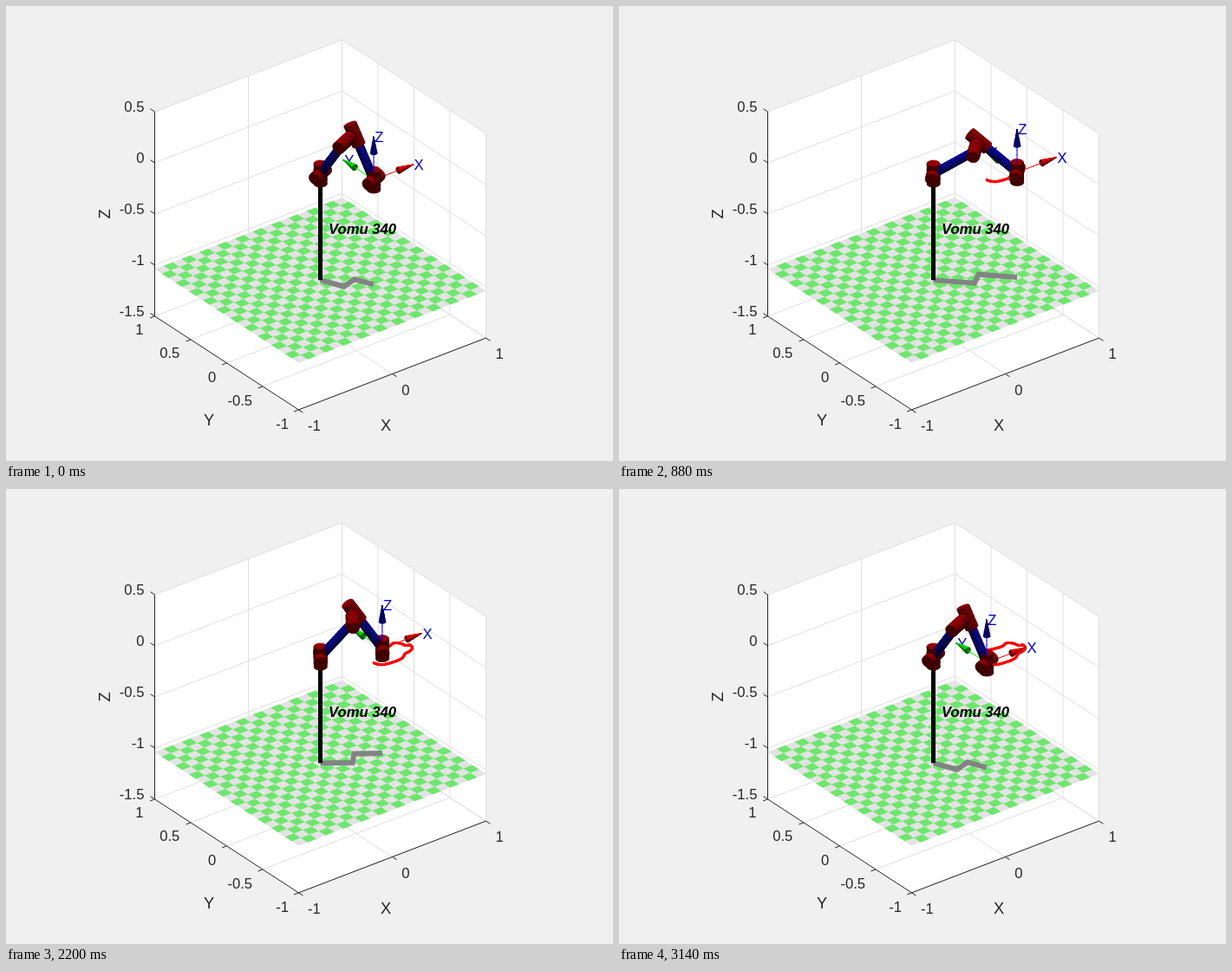
An HTML page with a canvas that plays this animation: 700x525 px, repeating every 3240 ms.

```html
<!DOCTYPE html>
<html>
<head>
<meta charset="utf-8">
<style>
html, body { margin: 0; width: 100%; height: 100%; overflow: hidden; background: #f0f0f0; }
canvas { display: block; }
</style>
</head>
<body>
<canvas id="stage" width="700" height="525"></canvas>
<script>
const ctx = document.getElementById('stage').getContext('2d');
const LOOP = 3240, LAST = 3140, STEP = 20;
const FLOOR = -1.04, TOOL_Z = -0.015, TILES = 21;
const FONT = '"Liberation Sans", Arial, sans-serif';

// Vectors and the orthographic view (azimuth -37.5, elevation 30)
const add = (a, b, s = 1) => a.map((c, i) => c + b[i] * s);
const dot = (a, b) => a[0] * b[0] + a[1] * b[1] + a[2] * b[2];
const unit = a => a.map(c => c / Math.hypot(...a));
const cross = (a, b) => [a[1] * b[2] - a[2] * b[1], a[2] * b[0] - a[0] * b[2], a[0] * b[1] - a[1] * b[0]];
const mix = (a, b, s) => a.map((c, i) => c + (b[i] - c) * s);
const VIEW = [-0.527, -0.687, 0.5];
const LIGHT = unit([-0.08, -0.12, 1]);
const CX = 362.5, CY = 193.5, EX = [108, -41.4], EY = [-83, -54], EZ = -118;
const project = ([x, y, z]) => [CX + x * EX[0] + y * EY[0], CY + x * EX[1] + y * EY[1] + z * EZ];

// Screen position on the tool plane -> world point
function unproject(sx, sy) {
  const u = sx - CX, v = sy - CY - TOOL_Z * EZ;
  const det = EX[0] * EY[1] - EY[0] * EX[1];
  return [(u * EY[1] - v * EY[0]) / det, (v * EX[0] - u * EX[1]) / det, TOOL_Z];
}

function trace(points, close) {
  ctx.beginPath();
  points.forEach(p => ctx.lineTo(...project(p)));
  if (close) ctx.closePath();
}
function stroke(points, color, width = 1) {
  trace(points);
  ctx.strokeStyle = color;
  ctx.lineWidth = width;
  ctx.stroke();
}
function fill(points, color) {
  trace(points, true);
  ctx.fillStyle = color;
  ctx.fill();
}
function text(str, x, y, align = 'left', size = 16.67, color = '#262626', style = '') {
  ctx.font = `${style} ${size}px ${FONT}`;
  ctx.textAlign = align;
  ctx.fillStyle = color;
  ctx.fillText(str, x, y);
}

// Tool path: time, screen x, screen y
const path = [
  [0, 424, 200.5], [170, 431, 202.5], [300, 437, 202.3], [600, 450, 198.5], [790, 457, 195],
  [880, 459, 192], [940, 460.3, 190], [1080, 465, 187.5], [1240, 468.5, 183.5], [1380, 466, 180],
  [1500, 461, 180.5], [1650, 455, 178.2], [1820, 447, 177.8], [1990, 442, 181.5],
  [2250, 432, 184.5], [2580, 420.5, 187.5], [2850, 418.5, 193.5], [LAST, 424, 200.5]
];
function toolAt(t) {
  const n = path.length - 1;
  const key = i => {
    const k = path[(i + n) % n], turn = Math.floor(i / n);
    return [k[0] + turn * LAST, k[1], k[2]];
  };
  let i = 0;
  while (i < n - 1 && path[i + 1][0] <= t) i++;
  const [a, b, c, d] = [key(i - 1), key(i), key(i + 1), key(i + 2)];
  const h = c[0] - b[0], s = (t - b[0]) / h;
  const ease = j => {
    const m0 = (c[j] - a[j]) / (c[0] - a[0]) * h, m1 = (d[j] - b[j]) / (d[0] - b[0]) * h;
    return b[j] + s * m0 + s * s * (3 * (c[j] - b[j]) - 2 * m0 - m1)
      + s * s * s * (2 * (b[j] - c[j]) + m0 + m1);
  };
  return unproject(ease(1), ease(2));
}

// Joint positions by inverse kinematics
function pose(tool) {
  const upper = 0.4318, fore = 0.4323, shift = 0.15;
  const reach = Math.sqrt(tool[0] ** 2 + tool[1] ** 2 - shift ** 2);
  const yaw = Math.atan2(tool[1], tool[0]) - Math.atan2(shift, reach);
  const ahead = [Math.cos(yaw), Math.sin(yaw), 0];
  const side = [-ahead[1], ahead[0], 0];
  const dist = Math.hypot(reach, tool[2]);
  const lift = Math.atan2(tool[2], reach)
    + Math.acos((upper ** 2 + dist ** 2 - fore ** 2) / (2 * upper * dist));
  const elbow = add(ahead.map(c => c * upper * Math.cos(lift)), [0, 0, upper * Math.sin(lift)]);
  const corner = add(elbow, side, shift);
  const normal = cross(side, unit(add(tool, corner, -1)));
  const bend = add(corner, normal, normal[2] < 0 ? -0.0203 : 0.0203);
  return { side, elbow, bend };
}

// Depth-sorted scene parts
let parts = [];
const put = (at, draw) => parts.push([dot(at, VIEW), draw]);

function face(points, normal, rgb) {
  if (dot(normal, VIEW) <= 0) return;
  const k = 0.3 + 0.6 * Math.max(0, dot(normal, LIGHT));
  const color = `rgb(${rgb.map(c => Math.round(c * k)).join()})`;
  const mid = points.reduce((s, p) => add(s, p, 1 / points.length), [0, 0, 0]);
  put(mid, () => {
    fill(points, color);
    ctx.strokeStyle = color;
    ctx.lineWidth = 0.6;
    ctx.stroke();
  });
}
function tube(p, q, r0, r1, rgb, slices) {
  const sides = 24, d = unit(add(q, p, -1));
  const u = unit(cross(d, Math.abs(d[2]) > 0.9 ? [1, 0, 0] : [0, 0, 1])), v = cross(d, u);
  const out = k => {
    const a = k / sides * 2 * Math.PI;
    return add(u.map(c => c * Math.cos(a)), v, Math.sin(a));
  };
  const rim = (s, k) => add(mix(p, q, s), out(k), r0 + (r1 - r0) * s);
  for (let i = 0; i < slices; i++) {
    const s = i / slices, e = (i + 1) / slices;
    for (let k = 0; k < sides; k++)
      face([rim(s, k), rim(s, k + 1), rim(e, k + 1), rim(e, k)], out(k + 0.5), rgb);
  }
  const cap = s => Array.from({ length: sides }, (_, k) => rim(s, k));
  face(cap(0), d.map(c => -c), rgb);
  if (r1) face(cap(1), d, rgb);
}
const joint = (at, dir) => tube(add(at, dir, -0.1), add(at, dir, 0.1), 0.055, 0.055, [165, 0, 0], 4);
const link = (p, q) => tube(p, q, 0.036, 0.036, [0, 0, 190], 12);

function axis(at, dir, name, rgb) {
  const neck = add(at, dir, 0.26), tip = add(at, dir, 0.42);
  for (let i = 0; i < 6; i++) {
    const a = mix(at, neck, i / 6), b = mix(at, neck, (i + 1) / 6);
    put(mix(a, b, 0.5), () => stroke([a, b], `rgb(${rgb})`));
  }
  tube(neck, tip, 0.028, 0, rgb, 3);
  put(tip, () => {
    const [x, y] = project(tip);
    text(name, x + 1.2, y + 6, 'left', 16.67, '#0000c8');
  });
}

function drawBox() {
  ctx.fillStyle = '#f0f0f0';
  ctx.fillRect(0, 0, 700, 525);
  const lo = -1.5, hi = 0.5, grid = '#dfdfdf', ink = '#262626';
  fill([[-1, 1, lo], [-1, 1, hi], [1, 1, hi], [1, -1, hi], [1, -1, lo], [-1, -1, lo]], '#fff');
  for (const z of [-1.5, -1, -0.5, 0, 0.5]) stroke([[-1, 1, z], [1, 1, z], [1, -1, z]], grid);
  for (const x of [0, 1]) stroke([[x, -1, lo], [x, 1, lo], [x, 1, hi]], grid);
  for (const y of [-1, -0.5, 0, 0.5]) stroke([[-1, y, lo], [1, y, lo], [1, y, hi]], grid);
  stroke([[-1, 1, hi], [-1, 1, lo], [-1, -1, lo], [1, -1, lo]], ink);

  ['-1.5', '-1', '-0.5', '0', '0.5'].forEach((s, i) => {
    const z = -1.5 + i / 2, y = -1 + i / 2;
    stroke([[-1, 1, z], [-1, 1.06, z]], ink);
    text(s, 159.5, 357.5 - i * 59, 'right');
    stroke([[-1, y, lo], [-1.05, y, lo]], ink);
    text(['-1', '-0.5', '0', '0.5', '1'][i], 326 - i * 41.9, 488 - i * 27.2, 'right');
  });
  ['-1', '0', '1'].forEach((s, i) => {
    stroke([[i - 1, -1, lo], [i - 1, -1.06, lo]], ink);
    text(s, 348 + i * 108.3, 490 - i * 41.5);
  });
  text('X', 438, 490, 'center', 18.3);
  text('Y', 234, 484, 'center', 18.3);
  ctx.save();
  ctx.translate(120, 240);
  ctx.rotate(-Math.PI / 2);
  text('Z', 0, 0, 'center', 18.3);
  ctx.restore();
}

function drawFloor() {
  const quad = (x, y, s) => [[x, y, FLOOR], [x + s, y, FLOOR], [x + s, y + s, FLOOR], [x, y + s, FLOOR]];
  const size = 2 / TILES;
  fill(quad(-1, -1, 2), '#e3e3e3');
  for (let i = 0; i < TILES; i++)
    for (let j = (i + 1) % 2; j < TILES; j += 2) fill(quad(-1 + i * size, -1 + j * size, size), '#6ee66e');
}

function draw(t) {
  const tool = toolAt(t), { side, elbow, bend } = pose(tool);
  const base = [0, 0, 0], up = [0, 0, 1];
  drawBox();
  drawFloor();
  const drop = p => [p[0], p[1], FLOOR];
  stroke([base, elbow, bend, tool].map(drop), '#838383', 6);
  stroke([[0, 0, FLOOR], base], '#000', 5);

  parts = [];
  link(base, elbow);
  link(elbow, bend);
  link(bend, tool);
  joint(base, up);
  joint(base, side);
  joint(elbow, side);
  joint(bend, unit(add(tool, bend, -1)));
  joint(tool, side);
  joint(tool, up);
  axis(tool, [1, 0, 0], 'X', [255, 0, 0]);
  axis(tool, [0, 1, 0], 'Y', [0, 255, 0]);
  axis(tool, up, 'Z', [0, 0, 255]);
  for (let s = STEP; s <= t; s += STEP) {
    const a = toolAt(s - STEP), b = toolAt(s);
    put(b, () => stroke([a, b], '#f00', 3));
  }
  ctx.lineCap = 'round';
  parts.sort((a, b) => a[0] - b[0]).forEach(p => p[1]());
  ctx.lineCap = 'butt';
  text('Vomu 340', 372, 263, 'left', 16.67, '#000', 'italic bold');
}

const start = performance.now();
function tick() {
  const t = (performance.now() - start) % LOOP;
  draw(Math.min(LAST, Math.floor(t / STEP) * STEP));
  requestAnimationFrame(tick);
}
tick();
</script>
</body>
</html>
```
